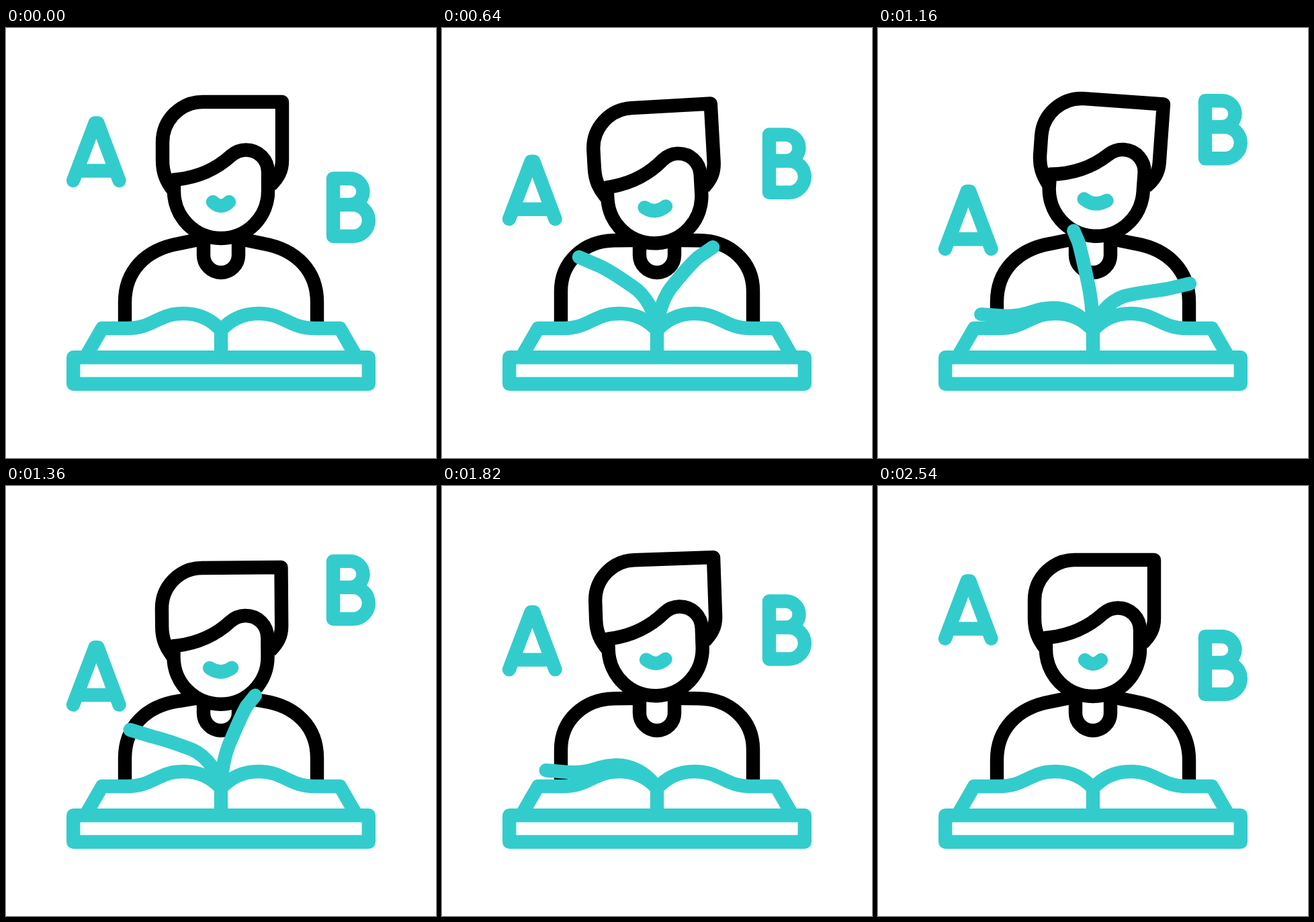
These frames come from a looping animation (640x640 px, 3.02 s). An HTML page:

```html
<!DOCTYPE html>
<html lang="en">
<head>
<meta charset="utf-8">
<title>Reading</title>
<style>
  html, body { margin: 0; width: 100%; height: 100%; overflow: hidden; background: #fff; }
  svg { display: block; width: 100%; height: 100%; }
  path, rect { fill: none; stroke-width: 20.4; stroke-linejoin: round; }
  .ink { stroke: #000; }
  .teal { stroke: #33cccc; }
  .cap { stroke-linecap: round; }
  .mask { fill: #fff; }
</style>
</head>
<body>
<svg viewBox="0 0 640 640">
  <path class="teal cap" id="a" d="M100 227L132.5 141.5H136.5L168.5 227M112 212.5H157"/>
  <path class="teal" id="b" d="M487 263H512a19.5 19.5 0 0 0 0-39H487V310H516.3a23.5 23.5 0 0 0 0-47H487"/>

  <path class="ink" id="left"/>
  <path class="ink" id="right" transform="matrix(-1 0 0 1 640 0)"/>
  <path class="ink" d="M294 302V338a26 26 0 0 0 52 0V302"/>

  <g id="head">
    <path class="mask" d="M293 110H411V197C411 214 405 224 390 243a70 70 0 0 1-140 0C238 228 233 215 233 197V170A60 60 0 0 1 293 110Z"/>
    <path class="ink" d="M250 243C238 228 233 215 233 197V170A60 60 0 0 1 293 110H411V197C411 213 405 223 394 234"/>
    <path class="ink" d="M250 226C285 223 312 211 335 190C342 184 349 181.5 357 181.5C376 181.5 390 196 390 215V243a70 70 0 0 1-140 0Z"/>
    <path class="teal cap" id="mouth"/>
  </g>

  <g class="teal">
    <path d="M117 492L143 447H180C220 447 225 425 264 425C285 425 305 433 320 450C335 433 355 425 376 425C415 425 420 447 460 447H497L523 492M320 450V488"/>
    <rect x="100.2" y="490.2" width="439.6" height="39.6"/>
  </g>
  <g id="pages"></g>
</svg>
<script>
const LOOP = 3020;
const PAGES = 4, TURN = 850, GAP = 333, FIRST = 22;
const $ = id => document.getElementById(id);
const mix = (a, b, k) => a + (b - a) * k;

// cubic-bezier(.45, 0, .55, 1), clamped outside 0..1
function ease(x) {
  let lo = 0, hi = 1;
  for (let i = 0; i < 18; i++) {
    const s = (lo + hi) / 2, r = 1 - s;
    if (1.35 * r * r * s + 1.65 * r * s * s + s * s * s < x) lo = s; else hi = s;
  }
  return lo * lo * (3 - 2 * lo);
}
const ramp = (t, from, to) => ease((t - from) / (to - from));

// Rises from 0 to 1 at the peak, then falls back
const pulse = (t, from, peak, to) => ramp(t, from, peak) - ramp(t, peak, to);

// Four swings, each handing over to the next; times are the turning points
const swing = (t, times, sizes) =>
  sizes.reduce((sum, size, i) => sum + size * pulse(t, times[i], times[i + 1], times[i + 2]), 0);

const BEATS = [0, 480, 960, 1440, 1920, 2400];
const TILTS = [0, 500, 1120, 1600, 2100, 2540];

// Page poses: x, y pairs of two curves and a straight tip, all from the spine
const flat = [335, 433, 355, 425, 376, 425, 415, 425, 420, 447, 460, 447, 497, 447];
const bent = [322, 425, 338, 398, 360, 386, 378, 376, 395, 365, 415, 358, 447, 346];
const upright = flat.map((_, i) => i % 2 ? 450 - 161 * ((i + 1) / 14) ** 0.8 : 320);
const flip = pose => pose.map((v, i) => i % 2 ? v : 640 - v);
const poses = [flat, bent, upright, flip(bent), flip(flat)];

function pagePath(u) {
  if (u <= 0 || u >= 1) return '';
  const i = Math.floor(u * 4);
  const p = poses[i].map((v, j) => mix(v, poses[i + 1][j], u * 4 - i));
  return `M320 450C${p.slice(0, 12)}L${p.slice(12)}`;
}

const pages = Array.from({ length: PAGES }, () => {
  const p = document.createElementNS('http://www.w3.org/2000/svg', 'path');
  p.setAttribute('class', 'teal cap');
  $('pages').append(p);
  return p;
});

function draw(t) {
  const lift = pulse(t, 0, 1200, 2380);
  $('a').setAttribute('transform', `translate(0 ${102 * lift})`);
  $('b').setAttribute('transform', `translate(0 ${-116 * lift})`);

  const s = pulse(t, 0, 540, 1230) + pulse(t, 1230, 1650, 2500);
  const shoulder = `M177 440V${408 - 17 * s}C177 ${362 - 15 * s} ${207 + 5 * s} ${330 - 14 * s}`
    + ` 257 ${321 - 5 * s}L296 ${313 + 3 * s}`;
  $('left').setAttribute('d', shoulder);
  $('right').setAttribute('d', shoulder);

  const bob = swing(t, BEATS, [13, -12.5, 13, -2]);
  const tilt = swing(t, TILTS, [-4, 4.2, -5, 2.6]);
  $('head').setAttribute('transform', `translate(0 ${bob}) rotate(${tilt} 320 309)`);

  const w = 12 + 5 * pulse(t, 0, 1000, 2540);
  $('mouth').setAttribute('d', `M${320 - w} 259Q320 270.5 ${320 + w} 259`);

  pages.forEach((p, i) => p.setAttribute('d', pagePath((t - FIRST - i * GAP) / TURN)));
}

const start = performance.now();
function tick() {
  draw((performance.now() - start) % LOOP);
  requestAnimationFrame(tick);
}
tick();
</script>
</body>
</html>
```
